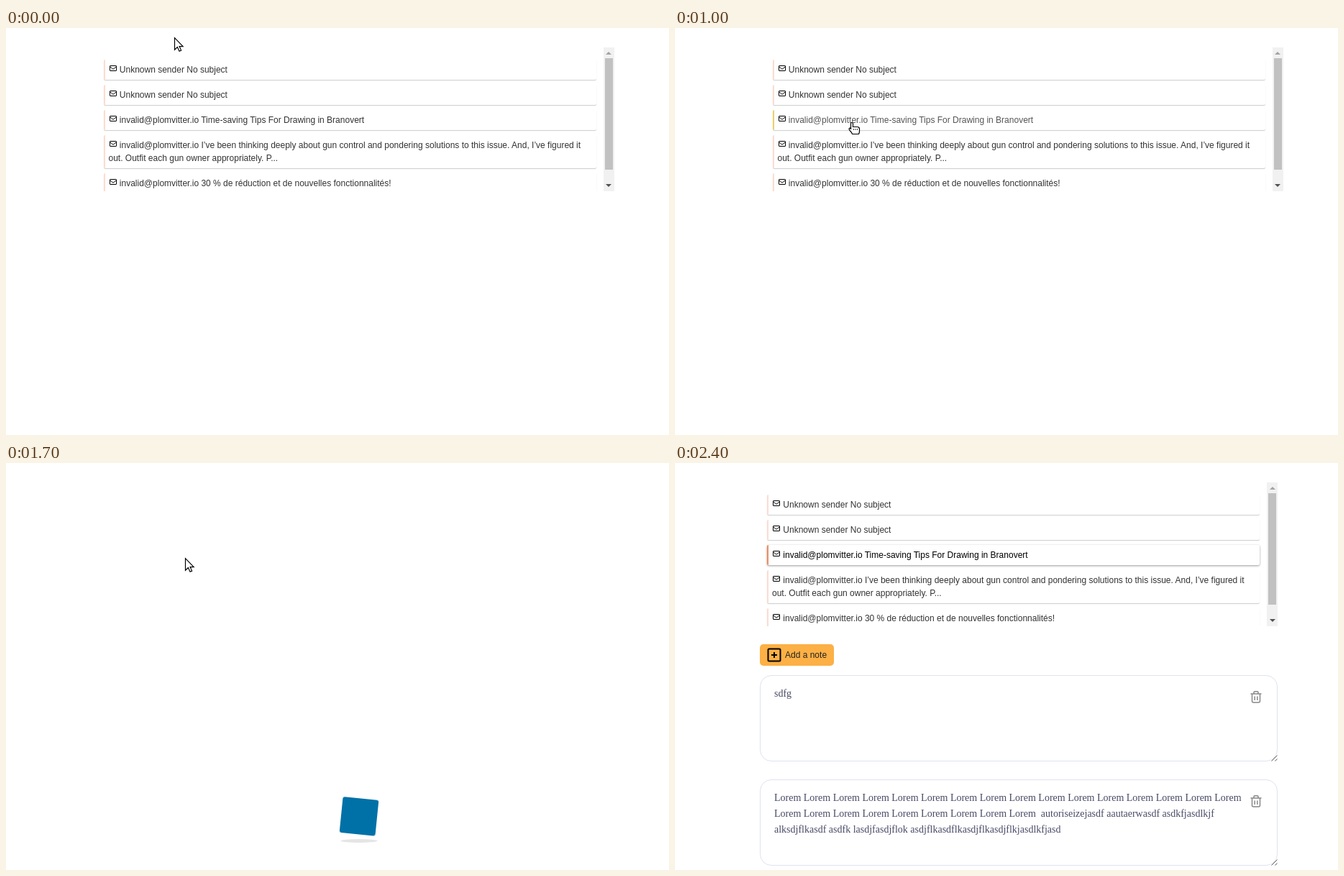
An HTML page that plays this animation: 922x566 px, repeating every 3100 ms.

```html
<!DOCTYPE html>
<html lang="en">
<head>
<meta charset="utf-8">
<title>Mail notes</title>
<style>
html, body { margin: 0; width: 100%; height: 100%; overflow: hidden; background: #fff; }
body { position: relative; font: 12px/18px "Liberation Sans", Arial, sans-serif; color: #333; }
body > *, .list > *, .note > * { position: absolute; box-sizing: border-box; }
[hidden] { display: none; }
svg { fill: none; stroke: #000; overflow: visible; }

.list { top: 27px; width: 720px; height: 200px; overflow: hidden; }
.row { left: 10px; width: 685px; padding: 5px; border-left: 2px solid #fddccf; border-radius: 2px;
  white-space: nowrap; box-shadow: 0 1px 1px rgba(0,0,0,.2); }
.row svg { stroke-width: 2; }
.row.hover { border-color: #edd06a; color: #555; }
.row.picked { border-color: #ee8c5c; color: #000; box-shadow: 0 1px 3px rgba(0,0,0,.4); }
.track { left: 705px; top: 0; width: 15px; height: 200px; background: #f1f1f1; }
.thumb { left: 707px; top: 15px; width: 11px; height: 155px; background: #c1c1c1; }
.up, .down { left: 708.5px; border: 4px solid transparent; }
.up { top: 6px; border-top: 0; border-bottom-color: #a3a3a3; }
.down { top: 190px; border-bottom: 0; border-top-color: #505050; }

.add { left: 118px; top: 252px; width: 103px; height: 30px; padding: 6px 0 0 35px; border-radius: 5px;
  background: #fcb045; color: #222; white-space: nowrap; }
.add svg { position: absolute; left: 10px; top: 5px; stroke-width: 2; }
.note { left: 118px; width: 720px; height: 120px; border: 1px solid #e0e2f0; border-radius: 16px; }
.note p { left: 19px; top: 14px; margin: 0; white-space: pre; color: #484a66;
  font: 14px/22px "Liberation Serif", "Times New Roman", serif; }
.note svg { left: 0; top: 0; stroke: #888; stroke-width: 1.5; }
.note .grip { stroke: #555; stroke-width: 1; }

.box, .shade { animation: .5s linear infinite paused; animation-delay: calc(var(--t) * -1ms); }
.box { left: 466px; top: 463.7px; width: 50px; height: 50px; border-radius: 3px;
  background: #0071a7; animation-name: tumble; }
.shade { left: 466px; top: 523px; width: 50px; height: 5px; border-radius: 50%;
  background: #000; opacity: .1; animation-name: spread; }
@keyframes tumble {
  17% { border-bottom-right-radius: 3px; }
  25% { transform: translateY(9px) rotate(22.5deg); }
  50% { transform: translateY(18px) scale(1, .9) rotate(45deg); border-bottom-right-radius: 40px; }
  75% { transform: translateY(9px) rotate(67.5deg); }
  100% { transform: translateY(0) rotate(90deg); }
}
@keyframes spread { 50% { transform: scale(1.2, 1); } }
.cursor path { fill: #fff; stroke-width: 1.2; }
</style>
</head>
<body>
<div class="list" id="list"></div>
<div class="add page">
  <svg width="20" height="20"><rect x="1.5" y="1.5" width="17" height="17" rx="1.5"/><path d="M6 10h8M10 6v8"/></svg>
  Add a note
</div>
<div class="shade load"></div>
<div class="box load"></div>
<svg class="cursor" id="arrow" width="16" height="22">
  <path d="M.5.7V17.3l3.9-3.7 2.6 5.7 2.6-1.2-2.5-5.5h5z"/>
</svg>
<svg class="cursor" id="hand" width="18" height="18">
  <path d="M3.5 10V2a1.5 1.5 0 0 1 3 0V6.5h6q3 0 3 3v3q0 2-1 4h-9q-.5-2-3-4.5-2-2.5-1.2-3.5 1-1 2.2.5z"/>
  <path d="M7.5 9v2M10 9v2M12.5 9v2" style="stroke-width:.8"/>
</svg>
<script>
const $ = id => document.getElementById(id);
const STEP = 100, LOOP = 3100, LOAD = 1200, SHOW = 1800;
const PICKED = 2;
const from = 'invalid@plomvitter.io ';
const mails = [
  [17, 28, 'Unknown sender No subject'],
  [52, 28, 'Unknown sender No subject'],
  [87, 28, from + 'Time-saving Tips For Drawing in Branovert'],
  [122, 46, from + 'I’ve been thinking deeply about gun control and pondering solutions to this issue. ' +
    'And, I’ve figured it<br>out. Outfit each gun owner appropriately. P...'],
  [175, 28, from + '30 % de réduction et de nouvelles fonctionnalités!']
];
const envelope = '<svg width="12" height="12" viewBox="0 0 24 24">' +
  '<rect x="3" y="5" width="18" height="14" rx="1"/><path d="M3 7.5l9 7 9-7"/></svg> ';

$('list').innerHTML = mails.map(([top, height, text]) =>
  `<div class="row" style="top:${top}px;height:${height}px">${envelope}${text}</div>`).join('') +
  ['track', 'thumb', 'up', 'down'].map(name => `<div class="${name}"></div>`).join('');
const rows = [...document.querySelectorAll('.row')];

const lorem = n => Array(n).fill('Lorem').join(' ');
function addNote(top, text) {
  $('arrow').insertAdjacentHTML('beforebegin', `<div class="note page" style="top:${top}px"><p>${text}</p>
    <svg width="718" height="118">
      <path d="M681.5 25h15M686 25v-2q0-1.2 1.2-1.2h3.6q1.2 0 1.2 1.2v2M683.5 25v10q0 2 2 2h7q2 0 2-2V25M687.2 28.5v5.5M690.8 28.5v5.5"/>
      <path class="grip" d="M710.5 118.5l8-8M715.5 118.5l3-3"/>
    </svg></div>`);
}
addNote(295, 'sdfg');
addNote(440, `${lorem(16)}\n${lorem(9)}  autoriseizejasdf aautaerwasdf asdkfjasdlkjf\n` +
  'alksdjflkasdf asdfk lasdjfasdjflok asdjflkasdflkasdjflkasdjflkjasdlkfjasd');

// pointer path: [time, x, y]
const path = [
  [0, 234, 13], [100, 237, 21], [200, 243, 40], [400, 249, 84], [600, 246, 118],
  [700, 243, 130], [800, 243, 136], [1000, 245, 131], [1200, 245, 131], [1700, 249, 132],
  [2000, 249, 132], [2100, 238, 124], [2200, 176, 76], [2300, 32, 3], [2400, -60, -60], [LOOP, -60, -60]
];
function pointer(t) {
  const i = path.findIndex(p => p[0] > t);
  const [t0, x0, y0] = path[i - 1], [t1, x1, y1] = path[i];
  const k = (t - t0) / (t1 - t0);
  return [Math.round(x0 + (x1 - x0) * k), Math.round(y0 + (y1 - y0) * k)];
}

function show(selector, on) {
  document.querySelectorAll(selector).forEach(el => el.style.display = on ? '' : 'none');
}

function draw(t) {
  const loading = t >= LOAD && t < SHOW, open = t >= SHOW;
  const [x, y] = pointer(t);
  const over = loading || x < 128 ? -1
    : mails.findIndex(([top, height]) => y >= top + 27 && y < top + 27 + height);

  show('.list', !loading);
  show('.load', loading);
  show('.page', open);
  $('list').style.left = (open ? 118 : 125.5) + 'px';
  rows.forEach((row, i) => {
    const picked = open && i === PICKED;
    row.classList.toggle('picked', picked);
    row.classList.toggle('hover', !picked && i === over);
  });
  document.body.style.setProperty('--t', t - LOAD + 32);

  show('#hand', over >= 0);
  show('#arrow', over < 0);
  $('hand').style.left = x - 4 + 'px';
  $('arrow').style.left = x + 'px';
  $('hand').style.top = $('arrow').style.top = y + 'px';
}

const start = performance.now();
function tick() {
  const t = (performance.now() - start) % LOOP;
  draw(Math.floor(t / STEP) * STEP);
  requestAnimationFrame(tick);
}
tick();
</script>
</body>
</html>
```
